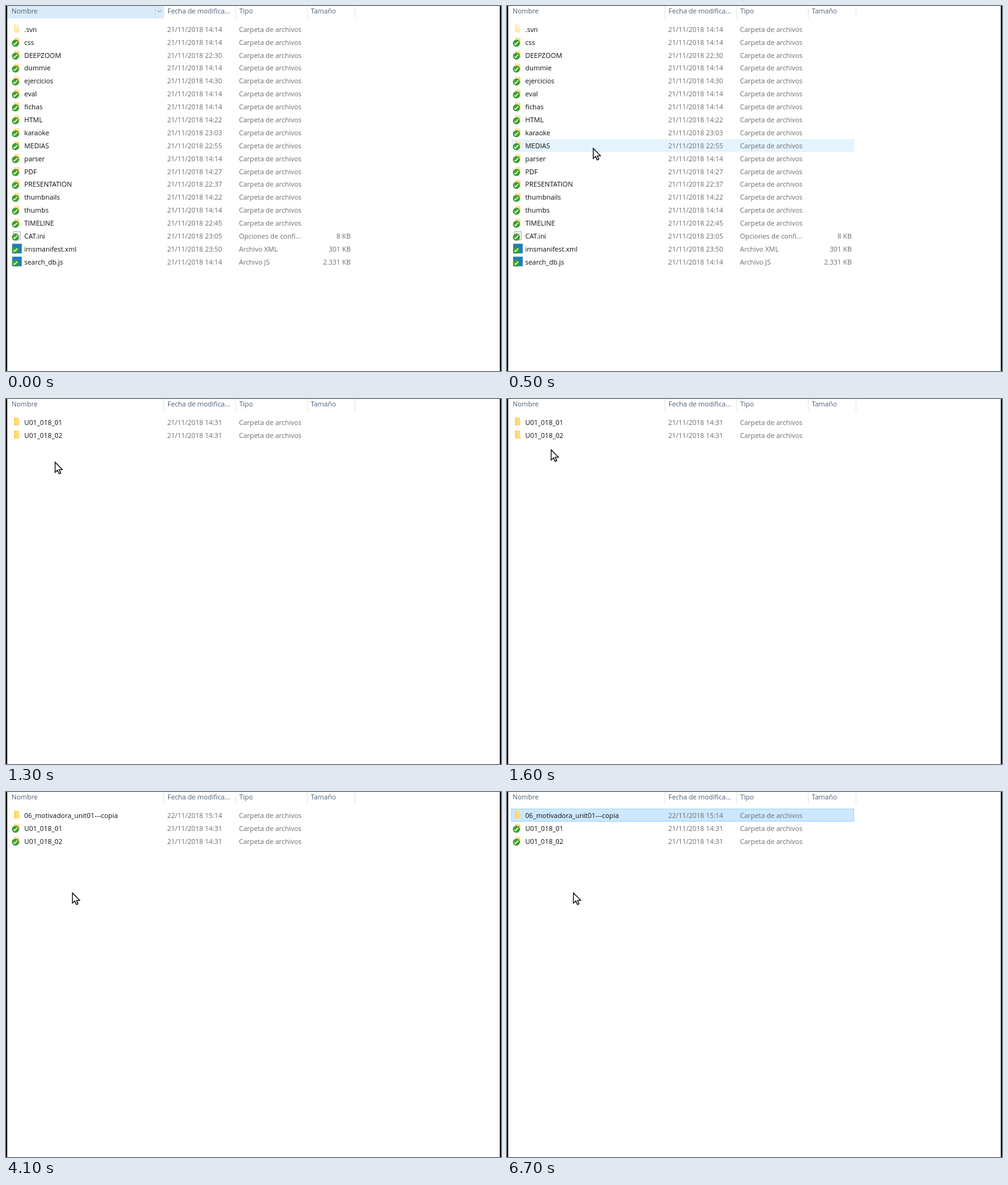
Animation, 800 px wide and 590 px high, one loop 7100 ms. Source, as an HTML page with a canvas:

```html
<!DOCTYPE html>
<html lang="es">
<head>
<meta charset="utf-8">
<style>
  html, body { margin: 0; width: 100%; height: 100%; overflow: hidden; background: #fff; }
  canvas { display: block; }
</style>
</head>
<body>
<canvas id="stage" width="800" height="590"></canvas>
<script>
const ctx = document.getElementById('stage').getContext('2d');
const LOOP = 7100, STEP = 100;
const ROW_TOP = 37.5, ROW_PITCH = 20.9;
const FONT = '10.95px "Open Sans", "Noto Sans", sans-serif';
const ARROW = [[0, 0], [0, 16], [3.7, 12.6], [6.3, 18.3], [8.8, 17.2], [6.3, 11.7], [11.3, 11.4]];

const folder = (name, time, icon = 'checked', day = '21/11/2018') =>
  ({ name, date: day + ' ' + time, type: 'Carpeta de archivos', icon });
const file = (name, time, type, size, icon) =>
  ({ name, date: '21/11/2018 ' + time, type, size, icon });

const rootRows = [
  folder('.svn', '14:14', 'faded'),
  folder('css', '14:14'),
  folder('DEEPZOOM', '22:30'),
  folder('dummie', '14:14'),
  folder('ejercicios', '14:30'),
  folder('eval', '14:14'),
  folder('fichas', '14:14'),
  folder('HTML', '14:22'),
  folder('karaoke', '23:03'),
  folder('MEDIAS', '22:55'),
  folder('parser', '14:14'),
  folder('PDF', '14:27'),
  folder('PRESENTATION', '22:37'),
  folder('thumbnails', '14:22'),
  folder('thumbs', '14:14'),
  folder('TIMELINE', '22:45'),
  file('CAT.ini', '23:05', 'Opciones de confi...', '8 KB', 'page'),
  file('imsmanifest.xml', '23:50', 'Archivo XML', '301 KB', 'code'),
  file('search_db.js', '14:14', 'Archivo JS', '2.331 KB', 'code')
];
const units = icon => ['U01_018_01', 'U01_018_02'].map(name => folder(name, '14:31', icon));
const plainUnits = units('plain'), checkedUnits = units('checked');
const copy = folder('06_motivadora_unit01---copia', '15:14', 'plain', '22/11/2018');

// Pointer keys: time, x, y
const pointerPath = [
  [100, 667, 573], [200, 528, 538], [300, 332, 444], [400, 170, 301],
  [500, 139, 230], [800, 79, 102], [1300, 79, 102], [1600, 71, 82],
  [1800, 93, 131], [2000, 107, 163]
];

function pointerAt(t) {
  if (t < pointerPath[0][0]) return null;
  const next = pointerPath.findIndex(key => key[0] > t);
  if (next < 0) return pointerPath[pointerPath.length - 1].slice(1);
  const [t0, x0, y0] = pointerPath[next - 1], [t1, x1, y1] = pointerPath[next];
  const k = (t - t0) / (t1 - t0);
  return [x0 + (x1 - x0) * k, y0 + (y1 - y0) * k];
}

function listAt(t) {
  if (t < 1300) return { rows: rootRows, selected: t >= 900 ? 3 : -1 };
  if (t < 3700) return { rows: t < 1800 ? plainUnits : checkedUnits, selected: -1 };
  if (t < 4000) return { rows: [...checkedUnits, copy], selected: 2 };
  return { rows: [copy, ...checkedUnits], selected: t >= 5900 ? 0 : -1 };
}

function rect(x, y, w, h, color) {
  ctx.fillStyle = color;
  ctx.fillRect(x, y, w, h);
}

function label(str, x, y, color, align = 'left') {
  ctx.textAlign = align;
  ctx.fillStyle = color;
  ctx.fillText(str, x, y);
}

function trace(points, color, width, close) {
  ctx.beginPath();
  points.forEach(([x, y]) => ctx.lineTo(x, y));
  if (close) ctx.closePath();
  ctx.strokeStyle = color;
  ctx.lineWidth = width;
  ctx.stroke();
}

function disc(x, y, r, color) {
  ctx.beginPath();
  ctx.arc(x, y, r, 0, Math.PI * 2);
  ctx.fillStyle = color;
  ctx.fill();
}

function badge(y) {
  disc(15.2, y, 5.6, '#2c8a22');
  disc(15.2, y, 4.7, '#3fa631');
  trace([[12.3, y + 0.6], [13.5, y + 2.4], [18.4, y - 2.6]], '#fff', 1.4);
}

function folderIcon(y, faded) {
  ctx.globalAlpha = faded ? 0.4 : 1;
  rect(13, y - 7.5, 8, 13, '#ffdc78');
  rect(13, y - 7.5, 2, 13, '#fad162');
  rect(16, y - 1, 5.5, 6.5, '#ffd97a');
  ctx.globalAlpha = 1;
}

function icon(kind, y) {
  if (kind === 'plain' || kind === 'faded') return folderIcon(y, kind === 'faded');
  if (kind === 'checked') {
    rect(13, y - 7, 8.5, 11, '#ffe09a');
    rect(17, y - 4, 4.5, 8, '#f9cd72');
  } else if (kind === 'page') {
    rect(11.5, y - 7.5, 12, 14, '#8d8d8d');
    rect(12.3, y - 6.7, 10.4, 12.4, '#fafafa');
    for (let i = 0; i < 4; i++) rect(14, y - 4.5 + i * 2.5, 7, 0.8, '#b5b5b5');
  } else {
    rect(10, y - 8.5, 15.5, 15.5, '#207cc4');
  }
  badge(y + 1.8);
}

function header(hot) {
  if (hot) {
    rect(2, 0, 253, 20, '#d9ebf9');
    rect(240.5, 0, 1, 20, '#b5d5ec');
    trace([[244.5, 6.5], [247.7, 9.7], [251, 6.5]], '#6c7f92', 1);
  }
  for (const x of [255, 371, 487, 564]) rect(x - 0.5, 0, 1, 20, '#e4e4e4');
  const titles = [['Nombre', 9], ['Fecha de modifica...', 261], ['Tipo', 377], ['Tamaño', 492.5]];
  for (const [title, x] of titles) label(title, x, 12, '#4f607a');
}

function drawRow(row, index, state) {
  const y = ROW_TOP + index * ROW_PITCH, top = y - 10.6;
  if (state === 'selected') {
    rect(6.5, top, 554.5, 21, '#99d1ff');
    rect(7.5, top + 1, 552.5, 19, '#cce8ff');
  } else if (state === 'hover') {
    rect(7, top, 554, 21, '#e5f3ff');
  }
  icon(row.icon, y);
  const base = Math.round(y + 4.2), gray = '#6d6d6d';
  label(row.name, 29.5, base, '#101010');
  label(row.date, 260.5, base, gray);
  label(row.type, 376.5, base, gray);
  if (row.size) label(row.size, 557, base, gray, 'right');
}

function arrow(x, y) {
  ctx.save();
  ctx.translate(x, y);
  trace(ARROW, '#111', 1.4, true);
  ctx.fillStyle = '#fff';
  ctx.fill();
  trace(ARROW, '#111', 1.2, true);
  ctx.restore();
}

function busyRing(x, y) {
  disc(x, y, 11, '#10202e');
  disc(x, y, 10, '#2490e4');
  ctx.beginPath();
  ctx.roundRect(x - 4.5, y - 4.5, 9, 9, 2.5);
  ctx.fillStyle = '#fff';
  ctx.fill();
  ctx.strokeStyle = '#10202e';
  ctx.lineWidth = 1;
  ctx.stroke();
}

function draw(t) {
  rect(0, 0, 800, 590, '#fff');
  ctx.font = FONT;
  header(t < 100);
  const pointer = pointerAt(t), { rows, selected } = listAt(t);
  const hovered = pointer ? Math.round((pointer[1] - ROW_TOP) / ROW_PITCH) : -1;
  rows.forEach((row, i) =>
    drawRow(row, i, i === selected ? 'selected' : i === hovered ? 'hover' : ''));
  if (pointer) {
    const [x, y] = pointer;
    if (t >= 2800 && t < 3700) busyRing(x + 15.5, y + 15);
    else arrow(x + 0.5, y + 0.5);
  }
  rect(0, 0, 2, 590, '#0c0c0c');
  rect(798, 0, 2, 590, '#0c0c0c');
}

const start = performance.now();
function tick() {
  const t = (performance.now() - start) % LOOP;
  draw(Math.floor(t / STEP) * STEP);
  requestAnimationFrame(tick);
}
tick();
</script>
</body>
</html>
```
